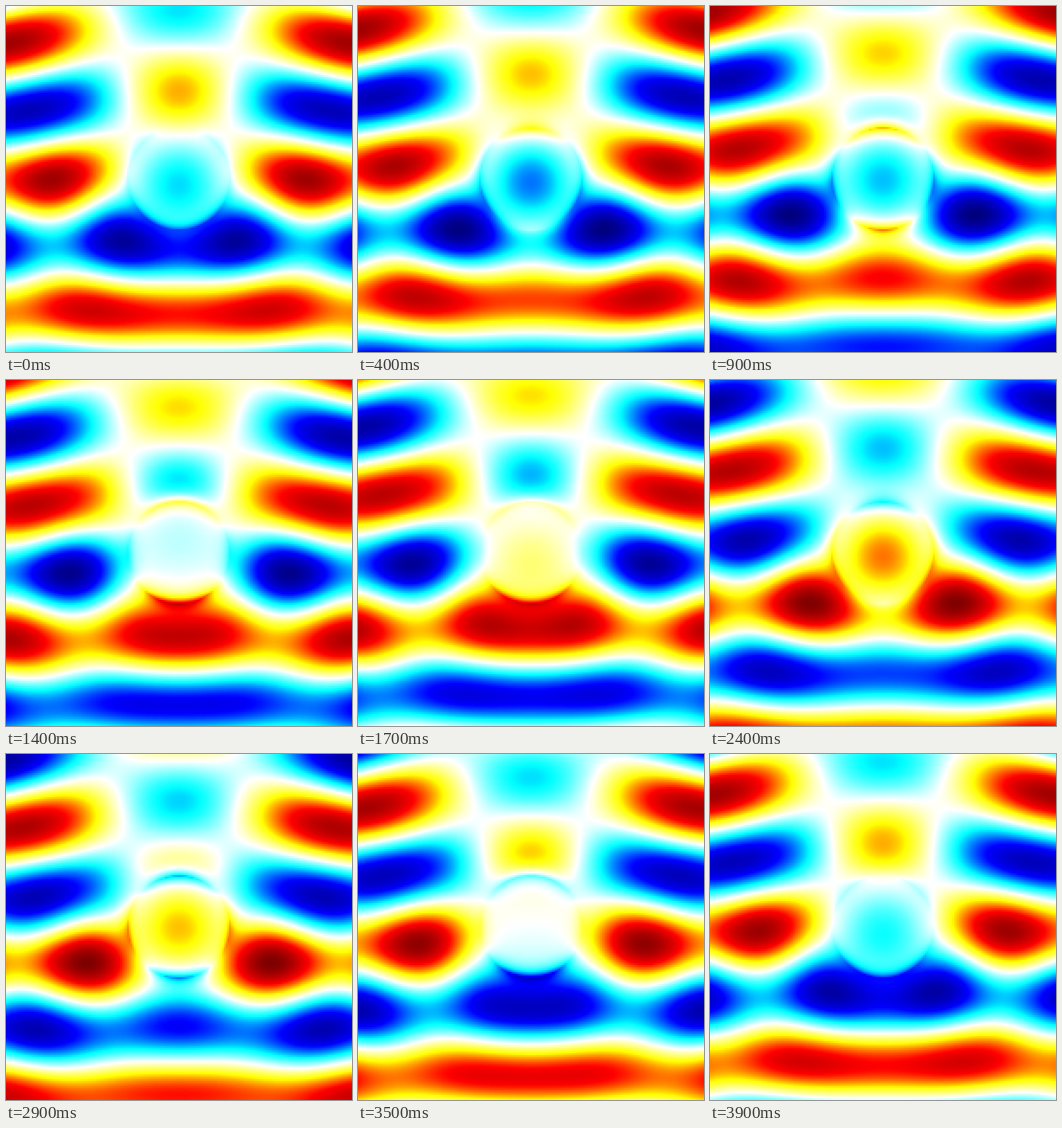
Animation, 400 px wide and 400 px high, one loop 4000 ms. Source, as a matplotlib script:

```python
"""A plane wave travelling upwards, scattered by a round cylinder."""
import numpy as np
import matplotlib.pyplot as plt
from matplotlib.animation import FuncAnimation
from matplotlib.colors import LinearSegmentedColormap

SIZE = 400
CELL = 2
FRAMES = 40
INTERVAL = 100

RADIUS = 59
K = 2 * np.pi / 154
AMPLITUDE = 0.66

# Scattering strength of the partial waves of order 0, 1, 2 and 3
SCATTER = [-.515 + .14j, -1, -.68 - .2j, -.04 - .13j]

CORE = -.37 - .36j       # field at the centre
RIM_OUT, RIM_IN = 12, 8  # decay lengths of the surface wave


def hankel(n, x):
    """Outgoing Hankel function H_n(x) from its integral form."""
    da, dt = np.pi / 600, 6 / 800
    a = (np.arange(600) + .5) * da
    t = (np.arange(800) + .5) * dt
    ring = np.exp(1j * (np.outer(x, np.sin(a)) - n * a)).sum(axis=1) * da
    growth = np.exp(n * t) + (-1) ** n * np.exp(-n * t)
    tail = (growth * np.exp(-np.outer(x, np.sinh(t)))).sum(axis=1) * dt
    return (ring - 1j * tail) / np.pi


def bessel(n, x):
    """Bessel function J_n(x) from its integral form."""
    a = (np.arange(100) + .5) * np.pi / 100
    return np.cos(n * a - x[..., None] * np.sin(a)).mean(axis=-1)


RADII = np.arange(RADIUS - 2, 300)
WAVES = [hankel(n, K * RADII) for n in range(len(SCATTER))]


def outer(r, angle):
    """Incident wave, scattered partial waves and the surface wave."""
    u = np.exp(1j * K * r * np.cos(angle))
    for n, (c, wave) in enumerate(zip(SCATTER, WAVES)):
        weight = (1 if n == 0 else 2) * 1j ** n * c
        u = u + weight * np.interp(r, RADII, wave) * np.cos(n * angle)
    rim = -.2 + .2j + .2 * np.cos(angle) + .75j * np.cos(2 * angle)
    return AMPLITUDE * u + rim * np.exp((RADIUS - r) / RIM_OUT)


def core(r, angle):
    x = 2.4 * r / RADIUS
    return CORE * bessel(0, x) + .1 * bessel(1, x) * np.cos(angle)


def inner(r, angle):
    """Core field, bent to meet the outer field along the rim."""
    edge = np.full_like(r, RADIUS)
    gap = outer(edge, angle) - core(edge, angle)
    return core(r, angle) + gap * np.exp((r - RADIUS) / RIM_IN)


axis = np.arange(CELL / 2, SIZE, CELL) - SIZE / 2
X, Y = np.meshgrid(axis, -axis)
R, ANGLE = np.hypot(X, Y), np.arctan2(X, Y)
field = np.where(R < RADIUS, inner(R, ANGLE), outer(R, ANGLE))

cmap = LinearSegmentedColormap.from_list("wave", [
    (0, 0, .5), (0, 0, 1), (0, 1, 1), (1, 1, 1),
    (1, 1, 0), (1, 0, 0), (.5, 0, 0)], N=512)

fig = plt.figure(figsize=(4, 4), dpi=100)
ax = fig.add_axes([0, 0, 1, 1])
ax.axis("off")
image = ax.imshow(field.real, cmap=cmap, vmin=-1, vmax=1,
                  interpolation="nearest", aspect="auto")


def draw(i):
    turn = np.exp(-2j * np.pi * i / FRAMES)
    image.set_data((field * turn).real)
    return [image]


anim = FuncAnimation(fig, draw, frames=FRAMES, interval=INTERVAL,
                     repeat=True, repeat_delay=0, blit=False)
plt.show()
```
